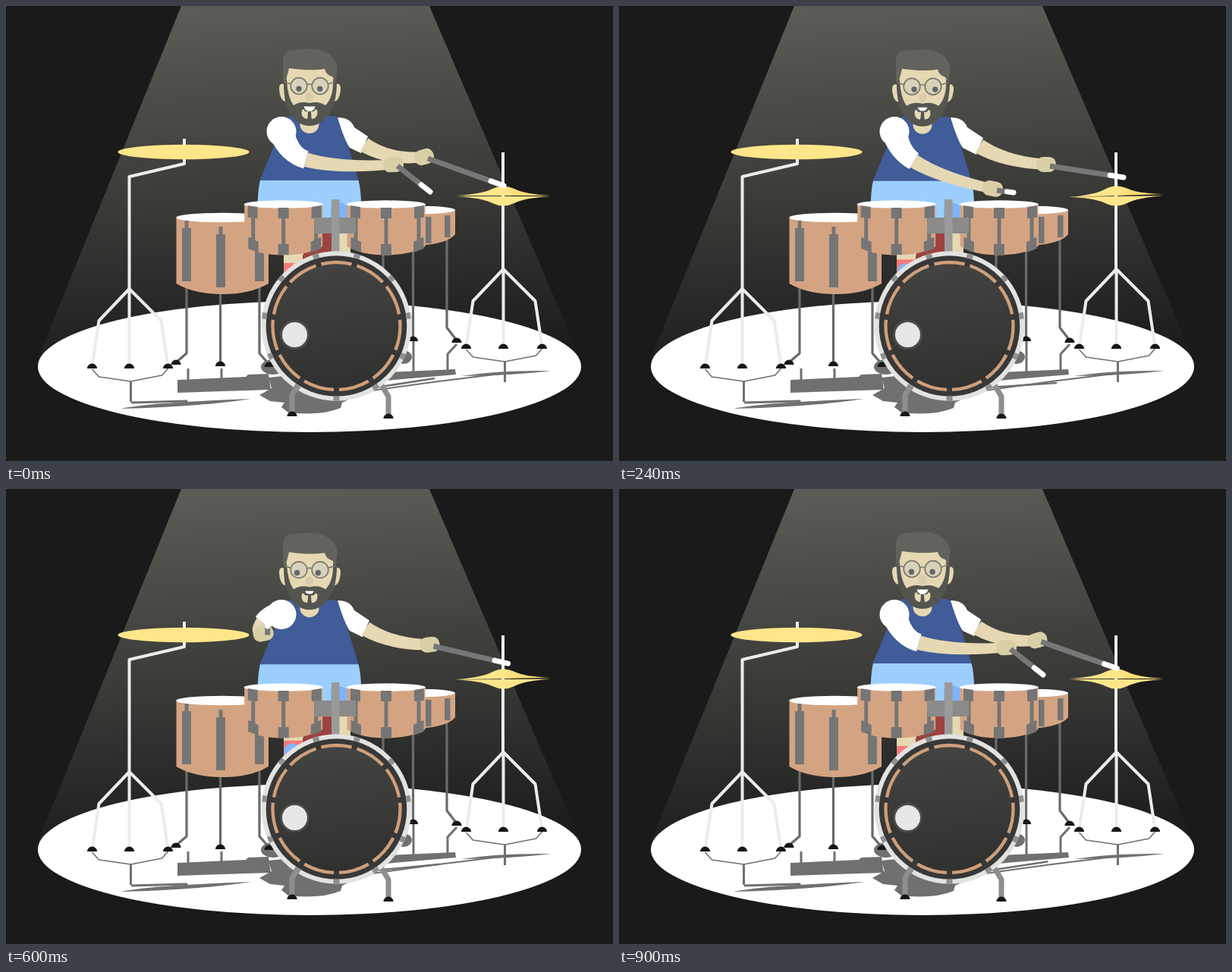
Animation of 800x600 px, one loop 930 ms. Source, as an HTML page:

```html
<!DOCTYPE html>
<html lang="en">
<head>
<meta charset="utf-8">
<title>Drummer</title>
<style>
html, body { margin: 0; width: 100%; height: 100%; overflow: hidden; background: #1a1a1a; }
svg { display: block; width: 100%; height: 100%; }
.line, .line path { fill: none; stroke-linejoin: round; }
.stand { stroke: #ececec; stroke-width: 4; }
.legs { stroke: #6a6a6a; stroke-width: 3.2; }
.footed path { marker-end: url(#foot); }
.shade { fill: #707070; }
.cast { stroke: #707070; stroke-width: 1.6; }
.wood { fill: #d4a482; }
.lug { fill: #757575; }
.skin { fill: #e5d8b2; }
.hand { fill: #d9cfa7; }
.beard { fill: #555550; }
.brass { fill: #ffe68a; }
.stick { stroke: #777; stroke-width: 7; }
.tip { stroke: #fff; stroke-width: 7; stroke-linecap: round; }
</style>
</head>
<body>
<svg viewBox="0 0 800 600">
  <defs>
    <linearGradient id="beam" gradientUnits="userSpaceOnUse" x1="380" y1="0" x2="408" y2="470">
      <stop stop-color="#5c5c56"/><stop offset="1" stop-color="#1c1c1c"/>
    </linearGradient>
    <linearGradient id="drumSkin" x2=".1" y2="1">
      <stop stop-color="#444442"/><stop offset="1" stop-color="#313130"/>
    </linearGradient>
    <linearGradient id="gold">
      <stop offset=".5" stop-color="#ffe68a"/><stop offset=".65" stop-color="#f9dc74"/>
    </linearGradient>
    <marker id="foot" markerUnits="userSpaceOnUse" markerWidth="14" markerHeight="8" refX="7" refY="4">
      <path d="M.5 7a6.500 6.500 0 0 1 13 0z" fill="#161616" stroke="none" style="fill:#161616;marker:none"/>
    </marker>
    <g id="tripod" class="line">
      <g class="cast">
        <path d="M-49 106L-40 116L2 122L43 114L51 105"/><path d="M2 122V149" stroke-width="3"/>
      </g>
      <g class="stand footed">
        <path d="M0 0V102"/><path d="M0 0L-40 42L-49 102"/><path d="M0 0L42 42L51 102"/>
      </g>
    </g>
    <path id="ear" class="skin" d="M-33 103Q-40 101 -40 109Q-39 124 -32 126z"/>
    <path id="lug" class="lug" d="M-7 266H7V280H2.500V314H7V328H-7V314H-2.500V280H-7z"/>
    <path id="sideLug" class="lug" d="M-47 263L-34 265V280H-37.500V309L-33 311V325L-46.500 320V305L-42.500 306V279H-47z"/>
    <g id="tom">
      <path class="wood" d="M-51.500 262H51.500V317Q32 328.500 0 328.500T-51.500 317z"/>
      <ellipse cy="261.500" rx="52" ry="5.200" fill="#fff"/>
      <use href="#lug"/><use href="#sideLug"/><use href="#sideLug" transform="translate(3 0) scale(-1 1)"/>
    </g>
    <path id="longLug" class="lug" d="M-2.500 283H2.500V293H6V363H-6V293H-2.500z"/>
  </defs>

  <path d="M231 0H558L757 465L400 500L42 465z" fill="url(#beam)"/>
  <ellipse cx="400" cy="475.500" rx="358" ry="86.500" fill="#fff"/>

  <g class="line cast">
    <path d="M476 508L570 495L660 484" stroke-width="2"/>
    <path d="M165 523L238 521V527M240 478V495M284 478V492M537 442V487M594 446L582 459V482" stroke-width="3"/>
    <path id="rightShadow" stroke-width="2.500"/>
  </g>
  <g class="shade">
    <path id="cymbalShadow" d="M151 531Q190 523 323 518Q260 528 151 531z"/>
    <path d="M226 493L316 489L319 486L346 485L349 506L226 510z"/>
    <path d="M600 488Q650 480 719 481Q660 488 600 488zM500 483L592 479L593 486L500 494z"/>
    <ellipse cx="352" cy="476" rx="16" ry="10"/>
    <ellipse cx="524" cy="463" rx="11" ry="9"/>
    <path d="M334 513L350 504L346 490L440 480L470 510L443 523L441 530Q415 541 372 536L363 529L367 523L348 521z"/>
  </g>
  <path id="armShadow" class="line cast" style="stroke-width:8"/>

  <path class="skin" d="M366 322H392V352H366zM437 295H454V330H437z"/>
  <g id="sock"><path d="M366 0H391V30H366z" fill="#f77b78"/><circle id="toe" cx="377.500" r="11" fill="#80b5f7"/></g>
  <path d="M412 295H430V325L391 345V329z" fill="#9b4340"/>
  <g id="body">
    <path d="M370 146Q377 144 387 145H432Q438 146 441 153L465 231H334L357 176z" fill="#405c99"/>
    <path d="M335 230H464.500Q469 245 468 282H331.500Q331 245 335 230z" fill="#9ccfff"/>
    <path d="M428 280V264Q440 254 450 264V280z" fill="#80b3fa"/>
    <path class="skin" d="M387.500 138V156a12.500 12 0 0 0 25 0V138z"/>
    <use href="#ear" x="400"/><use href="#ear" transform="translate(401 0) scale(-1 1)"/>
    <path class="skin" d="M368 78H433V105Q432 146 400 148Q368 146 368 105z"/>
    <path class="beard" d="M366 95Q365 125 374 141Q384 158 400 158Q416 158 427 141Q437 125 436 92L431 97Q432 120 421 131Q412 125 400 128Q388 125 379 131Q371 120 370 97z"/>
    <path class="skin" d="M390 137Q388 148 397 149L400 139L403 149Q412 148 410 137L400 134z"/>
    <path class="beard" d="M391 133Q400 129 409 133L406 139H402L402.500 150H397.500L398 139H394z"/>
    <path id="mouth" d="M-7.500 0H7.500Q6 6.500 0 6.500T-7.500 0z" fill="#fff"/>
    <path fill="#63635d" d="M365 99V71Q366 58 380 58Q406 54 419 60Q437 68 436.500 85L434 100L430 93Q422 91 420 83Q402 86 373 82L369 98z"/>
    <ellipse cx="400" cy="120" rx="5.500" ry="6" fill="#d8ccad"/>
    <g fill="#d9d2ba" stroke="#7c7b72" stroke-width="1.700">
      <circle cx="386" cy="105.500" r="10.800"/><circle cx="414" cy="105.500" r="10.800"/>
      <path class="line" d="M396.500 104Q400 102 403.500 104M375.500 103L367 100M424.500 103L434 100"/>
    </g>
    <g id="eyes" fill="#64646a"><circle cx="386" cy="109.300" r="3.700"/><circle cx="413.700" cy="109.300" r="3.700"/></g>
  </g>

  <use href="#tripod" x="162.500" y="373"/><use href="#tripod" x="655.500" y="347"/>
  <path class="line stand" d="M235 175V208L162.500 225V374M655 193V348"/>
  <ellipse id="cymbal" class="brass" cx="234" cy="192.500" rx="86.500" ry="9.700"/>
  <path id="hatTop" fill="url(#gold)" d="M593 250Q628 248 641 241Q655 234 670 241Q683 248 718 250z"/>
  <path id="hatBottom" class="brass" d="M593 251Q628 253 641 260Q655 267 670 260Q683 253 718 251z"/>

  <g class="line legs footed">
    <path d="M238 365V458L224 470"/><path d="M282.500 375V472"/><path d="M334 355V458L347 473"/>
    <path d="M536.500 315V439"/><path d="M581 308V424L594 441"/>
  </g>
  <path class="line legs" d="M497 325V350"/>
  <path class="wood" d="M224.500 279H346V366Q322 380 285 380T224.500 366z"/>
  <ellipse cx="285" cy="279" rx="60.700" ry="6.300" fill="#fff"/>
  <use href="#longLug" x="238"/><use href="#longLug" x="283" y="8"/><use href="#longLug" x="334"/>
  <path class="wood" d="M520 269H592V301Q583 313 545 316z"/>
  <ellipse cx="545" cy="269" rx="47" ry="5.300" fill="#fff"/>
  <path class="lug" d="M553 278h7.500v35h-7.500zM578 276h7.500v29h-7.500z"/>
  <use href="#tom" x="365.700"/><use href="#tom" x="501"/>
  <path d="M406.500 279H461V300H406.500z" fill="#8b8b8b"/>
  <path d="M429 255H439.500V326H429z" fill="#9a9a9a"/>

  <g class="line footed" stroke="#8e8e8e" stroke-width="7">
    <path d="M386 498L377 513V538"/><path d="M494 498L504 515V541"/>
  </g>
  <g transform="translate(435.500 422)" fill="none">
    <circle r="95.800" fill="#383838" stroke="#e2e2e0" stroke-width="6"/>
    <circle r="95.800" stroke="#8f8f8f" stroke-width="6" pathLength="11" stroke-dasharray=".15 .85" stroke-dashoffset="-.675"/>
    <circle r="82" fill="url(#drumSkin)"/>
    <circle r="84" stroke="#cf9f7a" stroke-width="4.300" pathLength="11" stroke-dasharray=".85 .15" stroke-dashoffset=".175"/>
    <circle cx="-55" cy="11.500" r="18" fill="#e7e7e7" stroke="#4c4c4c" stroke-width="3"/>
  </g>

  <path id="rightSleeve" fill="#fff"/>
  <path id="rightArm" class="skin"/>
  <rect id="rightHand" class="hand" x="-13" y="-10" width="26" height="20" rx="9"/>
  <path id="rightStick" class="line stick"/>
  <path id="rightTip" class="line tip"/>
  <path id="leftArm" class="skin"/>
  <path id="leftSleeve" fill="#fff"/>
  <circle cx="363" cy="165.500" r="19.500" fill="#fff"/>
  <rect id="leftHand" class="hand" x="-14" y="-10" width="27" height="20" rx="9"/>
  <path id="leftStick" class="line stick"/>
  <path id="leftTip" class="line tip"/>
</svg>
<script>
const LOOP = 930, STEP = 30;
const SHOULDER = [363, 166];
const set = (id, name, value) => document.getElementById(id).setAttribute(name, value);
const wave = (t, cycles) => (1 - Math.cos(2 * Math.PI * cycles * t / LOOP)) / 2;
const add = (p, x, y) => [p[0] + x, p[1] + y];
const gap = (p, q) => Math.hypot(q[0] - p[0], q[1] - p[1]);
const toward = (p, q, distance) => {
  const k = distance / (gap(p, q) || 1);
  return [p[0] + (q[0] - p[0]) * k, p[1] + (q[1] - p[1]) * k];
};

// Left hand strokes: time, hand x, y, stick tip x, y.
const strokes = [
  [0, 511, 209, 559, 245],
  [90, 513, 221, 568, 263],
  [240, 493, 241, 520, 246],
  [390, 469, 230, 509, 246],
  [510, 374, 233, 398, 251],
  [720, 317, 125, 307, 53]
];
const home = strokes[0].slice(1);
strokes.push([900, ...home], [LOOP, ...home]);

// Smooth interpolation without overshoot.
function sample(rows, t) {
  const i = rows.findIndex(row => row[0] > t) - 1;
  const [p, q] = [rows[i], rows[i + 1]];
  const span = q[0] - p[0], u = (t - p[0]) / span, v = 1 - u;
  const rate = (k, c) => rows[k] && rows[k + 1]
    ? (rows[k + 1][c] - rows[k][c]) / (rows[k + 1][0] - rows[k][0]) : 0;
  const slope = (k, c) => {
    const a = rate(k - 1, c), b = rate(k, c);
    return a * b > 0 ? 2 * a * b / (a + b) : 0;
  };
  return home.map((_, n) => n + 1).map(c =>
    p[c] * v * v * (1 + 2 * u) + q[c] * u * u * (1 + 2 * v)
    + span * u * v * (slope(i, c) * v - slope(i + 1, c) * u));
}

// Tapered band along a quadratic curve.
function limb(a, c, b, startWidth, endWidth) {
  const sides = (from, to, at, width) => {
    const [x, y] = toward([0, 0], [from[1] - to[1], to[0] - from[0]], width / 2);
    return [add(at, x, y), add(at, -x, -y)];
  };
  const [a1, a2] = sides(a, c, a, startWidth), [b1, b2] = sides(c, b, b, endWidth);
  const [c1, c2] = sides(a, b, c, (startWidth + endWidth) / 2);
  return `M${a1}Q${c1} ${b1}L${b2}Q${c2} ${a2}z`;
}

function drawGrip(side, elbow, hand, tip) {
  const angle = Math.atan2(hand[1] - elbow[1], hand[0] - elbow[0]) * 180 / Math.PI;
  const grip = add(hand, 5, 2), joint = toward(tip, grip, Math.min(18, 4 + .2 * gap(grip, tip)));
  set(side + 'Hand', 'transform', `translate(${hand}) rotate(${angle})`);
  set(side + 'Stick', 'd', `M${grip}L${joint}`);
  set(side + 'Tip', 'd', `M${joint}L${tip}`);
}

// The sleeve and elbow follow the hand.
function drawLeftArm(t) {
  const [x, y, tipX, tipY] = sample(strokes, t);
  const hand = [x, y], dx = x - SHOULDER[0], dy = y - SHOULDER[1];
  const cuff = add(SHOULDER, Math.max(-25, .36 * dx - 21), .14 * (dx + dy) + 10);
  const elbow = [(cuff[0] + x) / 2 - 16, (cuff[1] + y) / 2 + 14 - .13 * dy];
  set('leftSleeve', 'd', limb(SHOULDER, toward(cuff, elbow, -23), cuff, 34, 24));
  set('leftArm', 'd', limb(cuff, elbow, hand, 19, 13));
  drawGrip('left', elbow, hand, [tipX, tipY]);

  const reach = Math.max(0, -dy / 41);
  const cast = (x, y) => `${370 + x * reach} ${515 + y * reach}`;
  set('armShadow', 'd', `M370 515Q${cast(-35, 1)} ${cast(-58, 14)}L${cast(-42, 14)}L${cast(-58, 29)}`);
}

function drawRightArm(lift) {
  const cuff = [472 + 3 * lift, 183 + 2 * lift], hand = [551 + 12 * lift, 199 + 10 * lift];
  set('rightSleeve', 'd', `M437 147Q454 147 459 160L${add(cuff, 5, -11)}L${add(cuff, -4, 11)}L453 187Q446 177 437 147z`);
  set('rightArm', 'd', limb(cuff, add(cuff, 34, 21), hand, 20, 14));
  drawGrip('right', add(hand, -20, 6 * (1 - lift)), hand, [656 + 9 * lift, 237 - 11 * lift]);
  set('rightShadow', 'd', `M488 503L${565 + 12 * lift} ${491 + 6 * lift}`);
  set('hatTop', 'transform', `rotate(${-1.8 * lift} 655 250)`);
  set('hatBottom', 'transform', `rotate(${-.7 * lift} 655 250)`);
}

function draw(t) {
  const sway = wave(t, 1);
  drawLeftArm(t);
  drawRightArm(wave(t, 2));
  set('eyes', 'transform', `translate(${3 * Math.sin(2 * Math.PI * t / LOOP)} 0)`);
  set('body', 'transform', `translate(0 ${1.4 * sway})`);
  set('sock', 'transform', `translate(0 ${339 - 9 * sway})`);
  set('toe', 'cy', 18.5 - 4.5 * sway);
  set('mouth', 'transform', `translate(400 ${132.5 + sway}) scale(${1 - .3 * sway} ${1 - .5 * sway})`);
  const tilt = t < 180 ? 3 * Math.sin(Math.PI * t / 180) : 0;
  set('cymbal', 'transform', `rotate(${tilt} 234 192.5)`);
  set('cymbalShadow', 'transform', `rotate(${tilt / 4} 237 525)`);
}

function tick() {
  draw(Math.floor(performance.now() % LOOP / STEP) * STEP);
  requestAnimationFrame(tick);
}
tick();
</script>
</body>
</html>
```
